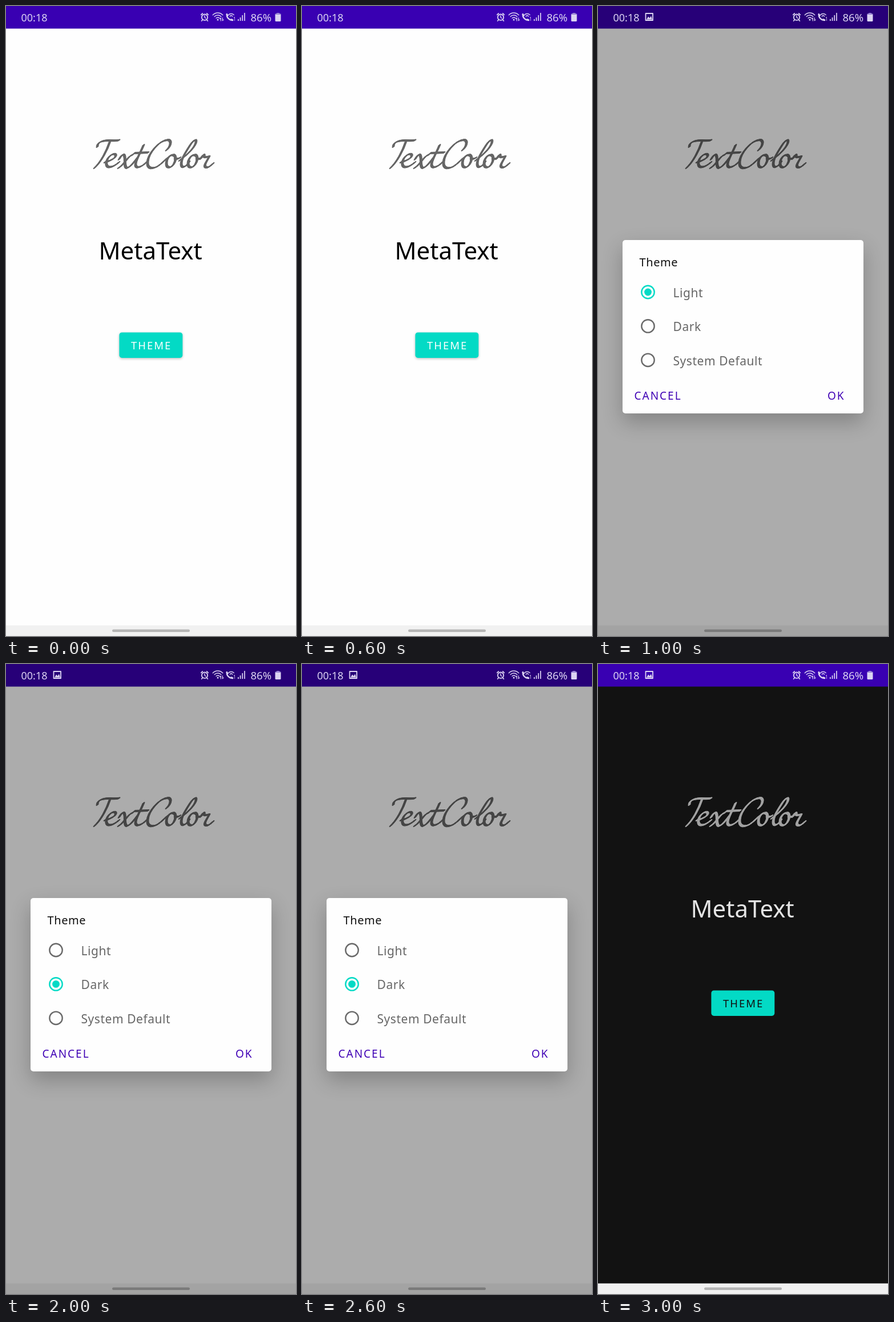
An HTML page with a canvas that plays this animation: 508 by 1101 pixels, repeating every 4 s.

```html
<!DOCTYPE html>
<html lang="en">
<head>
<meta charset="utf-8">
<title>Theme switch</title>
<style>
  html, body { margin: 0; width: 100%; height: 100%; overflow: hidden; background: #fff; }
  canvas { display: block; }
</style>
</head>
<body>
<canvas id="stage" width="508" height="1101"></canvas>
<script>
const ctx = document.getElementById('stage').getContext('2d');
const TEAL = '#03dac5', PURPLE = '#3f00b5', ICON = '#dcd4f2';

const LIGHT = { page: '#fefefe', script: '#666', meta: '#000', label: '#fff' };
const DARK = { page: '#121212', script: '#a1a1a1', meta: '#e4e4e4', label: '#111' };

const SCENES = [
  { theme: LIGHT },
  { theme: LIGHT, picked: 0, picture: true },
  { theme: LIGHT, picked: 1, picture: true },
  { theme: DARK, picture: true }
];

const O = 'M294 261 C287 258 281 268 281 275 C281 284 289 284 294 276 C298 269 298 262 293 260 M296 266 C299 268 302 267 305 265';
const LETTERS = [
  'M160 246 C160 238 169 235 179 235 S194 236 198 234.5 M182 237 C177 252 167 272 155 283',
  'M173 273 C183 271 194 265 192 260 C190 256 179 261 176 272 C174 284 184 285 198 273',
  'M198 268 C203 259 207 257 208 264 C209 272 207 283 212 283 C217 282 223 275 231 264 M222 260 C215 260 206 279 197 283',
  'M241 243 C236 256 228 268 227 276 C226 286 238 282 248 271 M225 257 L249 256',
  'M281 252 C289 245 291 234 283 234 C268 235 249 258 248 273 C247 286 258 284 264 281 S277 271 282 266',
  O,
  'M304 270 C318 260 332 246 333 237 C333 231 327 236 322 244 C313 258 307 268 307 276 C307 286 317 280 321 272',
  'M341 267 C345 259 348 258 347 263 C349 266 352 263 356 263 C353 270 346 278 349 281 C352 284 358 280 363 275'
];
const script = new Path2D(LETTERS.join(' '));
script.addPath(new Path2D(O), new DOMMatrix([1, 0, 0, 1, 38, 0]));

function rect(x, y, w, h, color, r = 0) {
  ctx.fillStyle = color;
  ctx.beginPath();
  ctx.roundRect(x, y, w, h, r);
  ctx.fill();
}

function text(str, x, y, size, color, spacing = 0, weight = 400) {
  ctx.font = `${weight} ${size}px "Noto Sans", sans-serif`;
  ctx.letterSpacing = spacing + 'px';
  ctx.fillStyle = color;
  ctx.fillText(str, x, y);
}

function line(d, width, color = ICON) {
  ctx.strokeStyle = color;
  ctx.lineWidth = width;
  ctx.stroke(new Path2D(d));
}

function disc(x, y, r, color) {
  ctx.fillStyle = color;
  ctx.beginPath();
  ctx.arc(x, y, r, 0, 7);
  ctx.fill();
}

function ring(x, y, r, width, color, from = 0, to = Math.PI * 2) {
  ctx.strokeStyle = color;
  ctx.lineWidth = width;
  ctx.beginPath();
  ctx.arc(x, y, r, from, to);
  ctx.stroke();
}

function shadowed(blur, dy, alpha, draw) {
  ctx.save();
  ctx.shadowColor = `rgba(0,0,0,${alpha})`;
  ctx.shadowBlur = blur;
  ctx.shadowOffsetY = dy;
  draw();
  ctx.restore();
}

// Slanted broad nib: thick downstrokes, thin joins.
function drawScript(color) {
  ctx.strokeStyle = color;
  ctx.lineWidth = 1.7;
  for (let k = -1; k <= 1; k += 0.25) {
    ctx.save();
    ctx.translate(1.6 * k, -1.1 * k);
    ctx.stroke(script);
    ctx.restore();
  }
}

function drawPage(t) {
  rect(0, 0, 508, 1101, t.page);
  rect(0, 0, 508, 39.4, '#3900b2');
  drawScript(t.script);
  text('MetaText', 162.5, 443, 42, t.meta);
  const button = () => rect(198.4, 570.4, 110.9, 44.6, TEAL, 4.7);
  if (t === LIGHT) shadowed(4, 1.5, 0.25, button);
  else button();
  text('THEME', 219, 600, 18.5, t.label, 2);
  rect(0, 1082.4, 508, 19, '#f1f1f1');
  rect(186, 1089.5, 136, 4.5, '#b5b5b5', 2.25);
}

function drawFan(x, y, radii) {
  for (const r of radii) ring(x, y, r, 1.4, ICON, -Math.PI * 0.76, -Math.PI * 0.24);
}

function drawStatus(picture) {
  text('00:18', 26.5, 26.5, 18, ICON);
  text('86%', 428.5, 26.5, 18.5, ICON);

  if (picture) {
    line('M83.5 13 H96 V25 H83.5 Z', 1.8);
    ctx.fill(new Path2D('M85 23.5 L88 18.5 L90.5 21 L93 17.5 L95 23.5 Z'));
  }

  // alarm clock
  ring(348, 19.7, 5.2, 1.8, ICON);
  line('M341.8 15.3 L344.3 13 M351.7 13 L354.2 15.3 M344 24.5 L342.7 26 M352 24.5 L353.3 26', 1.8);
  line('M348 17 V20 L350 21.3', 1.4);

  // wifi with arrows
  drawFan(371, 24, [4, 8, 12]);
  disc(371, 24, 1.5, ICON);
  line('M376.3 26 V21 M374.8 22.5 L376.3 20.8 M379.3 20.5 V25.5 M380.8 24 L379.3 25.7', 1.2);

  // wifi call
  line('M387 14.5 C386 20 391 25 397 25', 2.3);
  line('M386.7 14.5 L388.3 16.5 M394.5 23.7 L397 24.5', 2.8);
  drawFan(394.5, 20, [3, 6.5]);
  text('1', 398, 26, 8, ICON);

  // signal and battery
  [3, 6, 10, 14].forEach((h, i) => rect(406 + i * 3.7, 26 - h, 1.7, h, ICON));
  rect(474, 12, 5, 2, '#8f78cf');
  rect(471.5, 13.5, 10, 13.5, ICON, 1.5);
  rect(471.5, 13.5, 10, 1.5, '#8f78cf', 1);
}

function drawDialog(picked) {
  rect(0, 0, 508, 1101, 'rgba(0,0,0,.325)');
  shadowed(36, 15, 0.24, () => rect(43, 409, 422, 303, '#fefefe', 5));
  text('Theme', 72.5, 455, 20, '#111', 0.6);
  ['Light', 'Dark', 'System Default'].forEach((name, i) => {
    const y = 500 + i * 59.4, on = i === picked;
    ring(87.5, y, 11.2, 2.4, on ? TEAL : '#696969');
    if (on) disc(87.5, y, 6.4, TEAL);
    text(name, 131.5, y + 8.8, 21, '#666', 0.55);
  });
  text('CANCEL', 63.5, 688, 19, PURPLE, 2, 500);
  text('OK', 402, 688, 19, PURPLE, 2, 500);
}

function draw(now) {
  const { theme, picked, picture } = SCENES[Math.floor(now / 1000) % SCENES.length];
  ctx.lineCap = ctx.lineJoin = 'round';
  drawPage(theme);
  if (picked !== undefined) drawDialog(picked);
  drawStatus(picture);
}

const start = performance.now();
function tick() {
  draw(performance.now() - start);
  requestAnimationFrame(tick);
}
tick();
</script>
</body>
</html>
```
